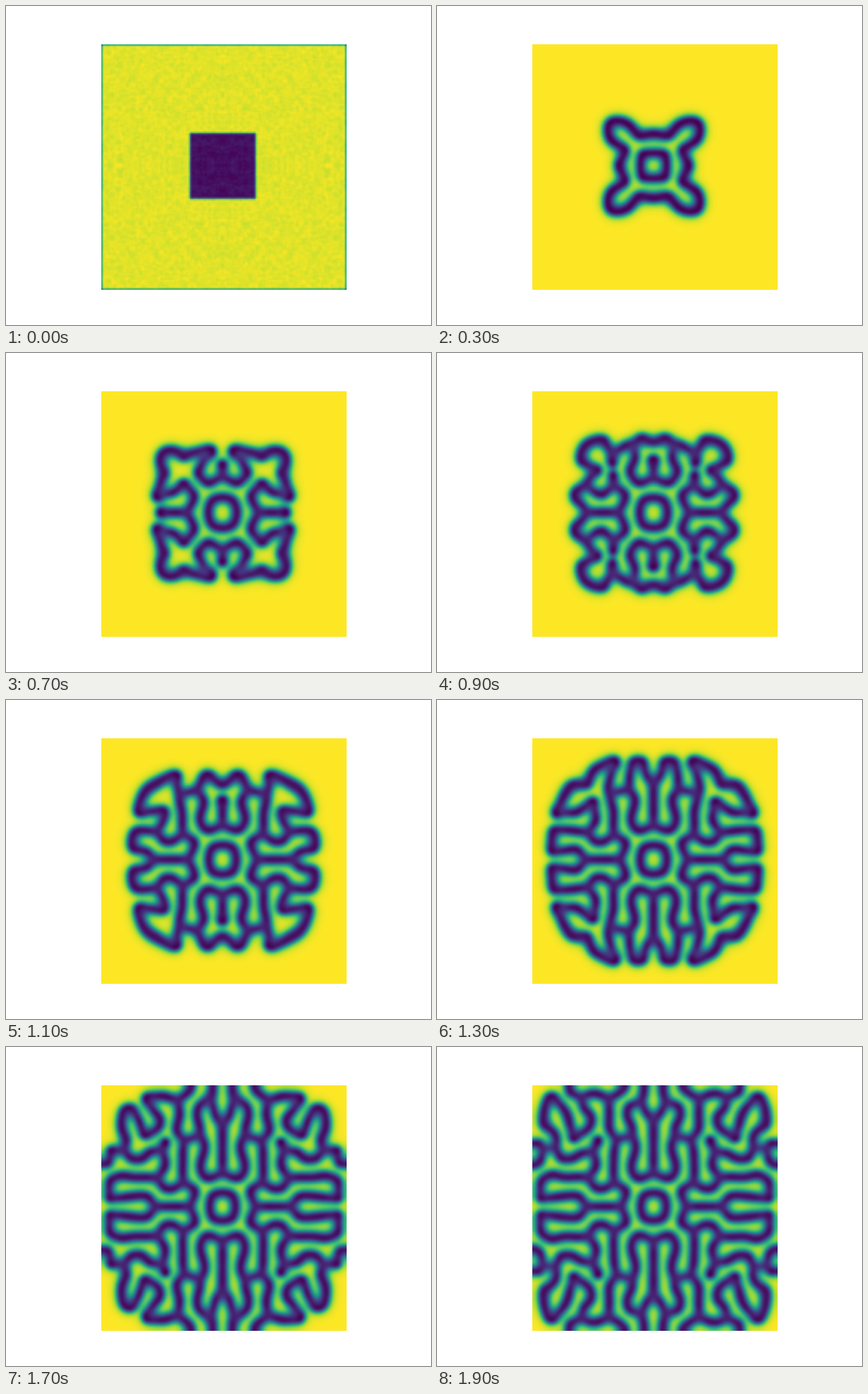
An HTML page with a canvas for the animation above (2000 ms loop, 544 by 408 pixels).

```html
<!DOCTYPE html>
<html lang="en">
<head>
<meta charset="utf-8">
<title>Reaction-diffusion growth</title>
<style>
  html, body { margin: 0; width: 100%; height: 100%; overflow: hidden; background: #fff; }
  canvas { display: block; }
</style>
</head>
<body>
<canvas id="stage" width="544" height="408"></canvas>
<script>
// Gray-Scott reaction on one quarter of the dish; the other three mirror it.
const DIFFUSE_U = 0.16, DIFFUSE_V = 0.08, FEED = 0.060, KILL = 0.062;
const CELLS = 75, ROW = CELLS + 2, SEED_CELLS = 20, NOISE = 0.03;
const FRAMES = 20, FRAME_MS = 100;
const PANEL = { left: 122, top: 49, right: 436, bottom: 363, x: 277, y: 204 };

// The step count per frame is set so that the arms reach this far at this time.
const REACH_CELLS = 60, REACH_FRAME = 11;
const SAMPLE_STEPS = 40, MAX_SAMPLES = 700;

let u = new Float64Array(ROW * ROW), v = new Float64Array(ROW * ROW);
let nextU = new Float64Array(ROW * ROW), nextV = new Float64Array(ROW * ROW);

let randomState = 7;
const random = () =>
  (randomState = (randomState * 1664525 + 1013904223) % 4294967296) / 4294967296;

function seed() {
  const jitter = () => NOISE * (random() * 2 - 1);
  for (let y = 1; y <= CELLS; y++) {
    for (let x = 1; x <= CELLS; x++) {
      const inside = Math.max(x, y) <= SEED_CELLS;
      u[y * ROW + x] = (inside ? 0.5 : 1) + jitter();
      v[y * ROW + x] = (inside ? 0.25 : 0) + jitter();
    }
  }
}

// Copies the cells at index `from` to the margin at index `to`, on both axes.
function mirror(grid, from, to) {
  for (let i = 1; i <= CELLS; i++) {
    grid[to * ROW + i] = grid[from * ROW + i];
    grid[i * ROW + to] = grid[i * ROW + from];
  }
}

function mirrorCentre() {
  for (const grid of [u, v]) mirror(grid, 1, 0);
}

function mirrorRim() {
  for (const grid of [u, v]) mirror(grid, CELLS, CELLS + 1);
}

function step() {
  for (let y = 1; y <= CELLS; y++) {
    for (let i = y * ROW + 1, end = i + CELLS; i < end; i++) {
      const a = u[i], b = v[i], reaction = a * b * b;
      const spreadU = u[i - 1] + u[i + 1] + u[i - ROW] + u[i + ROW] - 4 * a;
      const spreadV = v[i - 1] + v[i + 1] + v[i - ROW] + v[i + ROW] - 4 * b;
      nextU[i] = a + DIFFUSE_U * spreadU - reaction + FEED * (1 - a);
      nextV[i] = b + DIFFUSE_V * spreadV + reaction - (FEED + KILL) * b;
    }
  }
  [u, nextU] = [nextU, u];
  [v, nextV] = [nextV, v];
}

function reach() {
  let far = 0;
  for (let i = 0; i < v.length; i++) if (v[i] > 0.1) far = Math.max(far, i % ROW);
  return far;
}

function simulate() {
  seed();
  mirrorCentre();
  step(); // the rim is still empty here, which leaves a thin dark edge
  const samples = [u.slice()];
  const last = FRAMES - 1;
  let reached = 0;
  while (samples.length < MAX_SAMPLES) {
    if (!reached && reach() >= REACH_CELLS) reached = samples.length - 1;
    if (reached && samples.length - 1 >= reached * last / REACH_FRAME) break;
    for (let n = 0; n < SAMPLE_STEPS; n++) {
      mirrorCentre();
      mirrorRim();
      step();
    }
    samples.push(u.slice());
  }
  const perFrame = (samples.length - 1) / last;
  return Array.from({ length: FRAMES }, (_, f) => samples[Math.round(f * perFrame)]);
}

// Viridis, interpolated between nine anchors.
const anchors = [[68, 1, 84], [71, 44, 122], [59, 81, 139], [44, 113, 142], [33, 144, 141],
  [39, 173, 129], [92, 200, 99], [170, 220, 50], [253, 231, 37]];

function viridis(value) {
  const p = value * 8, i = Math.min(7, Math.floor(p));
  return anchors[i].map((c, k) => c + (anchors[i + 1][k] - c) * (p - i));
}

// Each picture spans the full colour range of its own values.
function paint(grid) {
  const canvas = Object.assign(document.createElement('canvas'), { width: CELLS, height: CELLS });
  const ctx = canvas.getContext('2d'), image = ctx.createImageData(CELLS, CELLS);
  const cells = Array.from({ length: CELLS * CELLS },
    (_, i) => grid[(Math.floor(i / CELLS) + 1) * ROW + i % CELLS + 1]);
  const low = Math.min(...cells), high = Math.max(...cells);
  cells.forEach((cell, i) =>
    image.data.set([...viridis((cell - low) / (high - low)), 255], i * 4));
  ctx.putImageData(image, 0, 0);
  return canvas;
}

const pictures = simulate().map(paint);
const stage = document.getElementById('stage').getContext('2d');

function draw(picture) {
  stage.fillStyle = '#fff';
  stage.fillRect(0, 0, 544, 408);
  for (const edgeX of [PANEL.left, PANEL.right]) {
    for (const edgeY of [PANEL.top, PANEL.bottom]) {
      stage.setTransform((edgeX - PANEL.x) / CELLS, 0, 0, (edgeY - PANEL.y) / CELLS,
        PANEL.x, PANEL.y);
      stage.drawImage(picture, 0, 0);
    }
  }
  stage.resetTransform();
}

function tick() {
  draw(pictures[Math.floor(performance.now() / FRAME_MS) % FRAMES]);
  requestAnimationFrame(tick);
}
tick();
</script>
</body>
</html>
```
